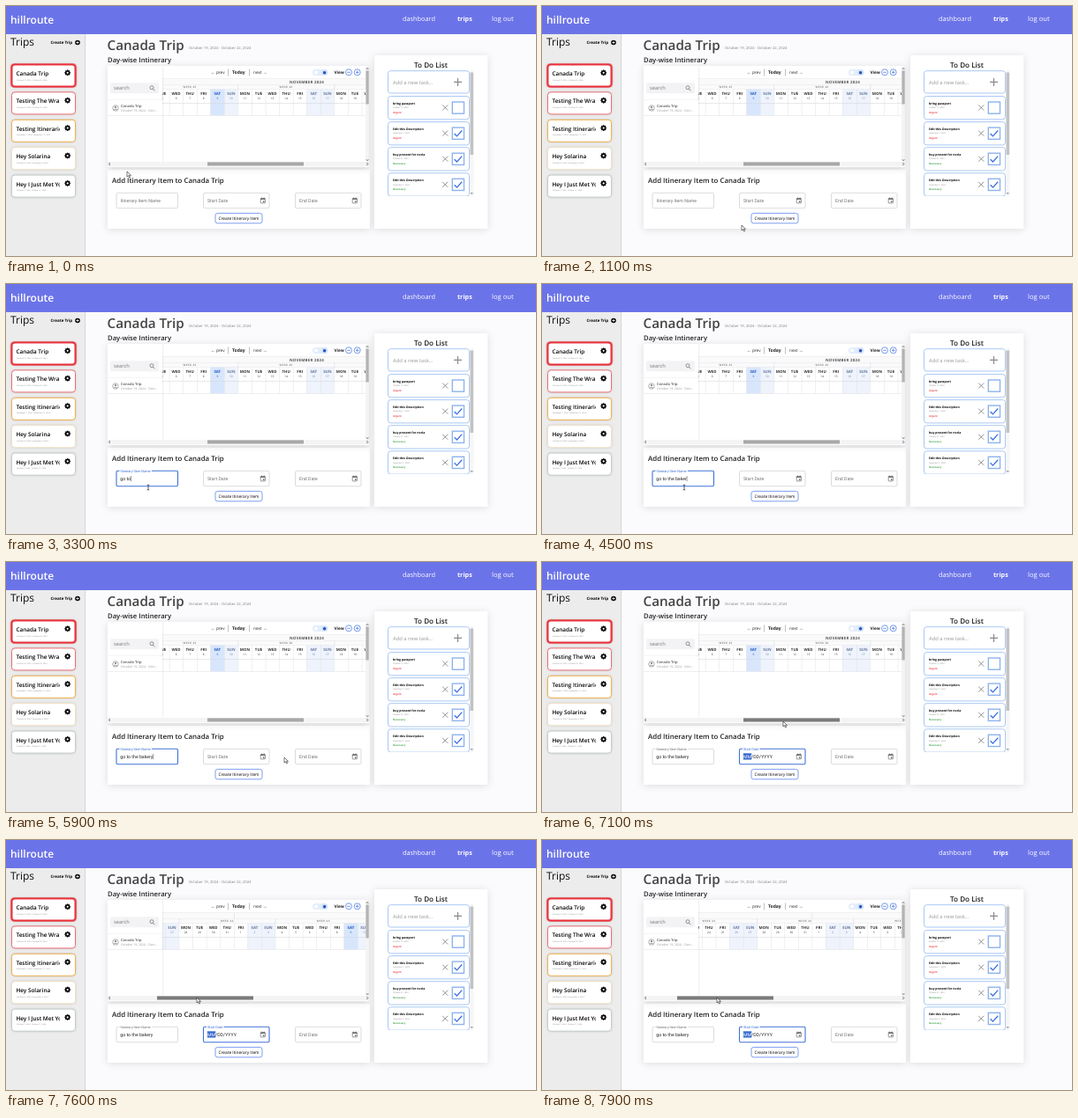
These frames come from a looping animation (600 by 284 pixels, 8 s). An HTML page:

```html
<!DOCTYPE html>
<html lang="en">
<head>
<meta charset="utf-8">
<title>Trip planner</title>
<style>
html, body { margin: 0; width: 100%; height: 100%; overflow: hidden; background: #fbfbfd; }
svg { display: block; width: 600px; height: 284px; font-family: "Open Sans", "Noto Sans", sans-serif; text-rendering: geometricPrecision; }
.field { font-family: Roboto, Arial, sans-serif; }
.card { filter: drop-shadow(0 1.5px 4px rgba(0, 0, 0, .12)); }
.trip { filter: drop-shadow(0 .5px 1px rgba(0, 0, 0, .15)); }
</style>
</head>
<body>
<svg id="stage" viewBox="0 0 600 284"></svg>
<script>
const LOOP = 8000;
const BLUE = '#3b6fe0', PALE = '#a9c8f3', INK = '#202020', GREY = '#808080';
const COL = 15.57, TODAY_X = 239.3, THUMB_X = 228, THUMB_W = 109, SCROLL_RATIO = 2.65;
const PHRASE = 'go to the bakery';

const text = (x, y, s, size, fill = INK, more = '') =>
  `<text x="${x}" y="${y}" font-size="${size}" fill="${fill}" ${more}>${s}</text>`;
const rect = (x, y, w, h, fill, more = '') =>
  `<rect x="${x}" y="${y}" width="${w}" height="${h}" fill="${fill}" ${more}/>`;
const path = (d, stroke, width = 1, more = '') =>
  `<path d="${d}" fill="none" stroke="${stroke}" stroke-width="${width}" ${more}/>`;
const circle = (x, y, r, fill, more = '') => `<circle cx="${x}" cy="${y}" r="${r}" fill="${fill}" ${more}/>`;
const clip = (id, x, y, w, h) => `<clipPath id="${id}">${rect(x, y, w, h, '#000')}</clipPath>`;
const BOLD = 'font-weight="700"', SEMI = 'font-weight="600"', MID = 'text-anchor="middle"';

function gear(x, y) {
  let teeth = '';
  for (let i = 0; i < 4; i++) teeth += rect(x - .8, y - 3.3, 1.6, 6.6, '#000', `transform="rotate(${i * 45} ${x} ${y})"`);
  return teeth + circle(x, y, 2.5, '#000') + circle(x, y, 1.1, '#fff');
}

function sidebar() {
  const trips = [
    ['Canada Trip', 'October 19, 2024 - October 22, 2024', '#e8323c'],
    ['Testing The Wra', 'October 29, 2024 - October 30, 2024', '#ea7077'],
    ['Testing Itineraries', 'November 7, 2024 - November 11, 2024', '#efb04c'],
    ['Hey Solarina', 'October 29, 2024 - November 6, 2024', '#f0e2c6'],
    ['Hey I Just Met You', 'October 7, 2024 - October 11, 2024', '#c3cdc9']
  ];
  let s = rect(0, 32, 90, 252, '#ececec') + rect(89.3, 32, .8, 252, '#cfcfcf')
    + text(5, 45.2, 'Trips', 12, '#111') + text(50.5, 43.2, 'Create Trip', 4.5, '#000', BOLD)
    + circle(81, 41.5, 2.8, '#000') + path('M79.3 41.5h3.4M81 39.8v3.4', '#fff', .8);
  trips.forEach(([name, dates, color], i) => {
    const y = 66.5 + i * 31.4, first = i === 0;
    if (first) s += rect(4.8, y - 1.2, 75.4, 27.4, '#f4a0a4', 'rx="4"');
    s += rect(6.5, y, 72, 25, '#fff', `rx="3.5" stroke="${color}" stroke-width="${first ? 2 : 1}" class="trip"`)
      + `<g clip-path="url(#names)">${text(11.5, y + 12.5, name, 6.4, '#000', SEMI)}</g>`
      + text(12, y + 18.1, dates, 2.05, GREY) + gear(69.7, y + 9.3);
  });
  return s;
}

function days() {
  let s = '';
  const names = ['SUN', 'MON', 'TUE', 'WED', 'THU', 'FRI', 'SAT'];
  for (let d = -20; d < 14; d++) {
    const date = new Date(Date.UTC(2024, 10, 9 + d)), wd = date.getUTCDay();
    const x = TODAY_X + d * COL, left = x - COL / 2, today = d === 0;
    if (wd === 0 || wd === 6) s += rect(left, 94.5, COL, 30, today ? '#d8e6fb' : '#eef3fc');
    const ink = today ? '#2255c8' : wd === 0 || wd === 6 ? '#65789c' : '#333';
    s += rect(left, 94.5, .5, 30, '#e0e0e5')
      + text(x, 100.6, names[wd], 4.4, ink, MID + ' ' + BOLD)
      + text(x, 105.6, date.getUTCDate(), 3.2, ink, MID);
    if (wd === 1) s += rect(left, 89, .5, 6, '#d5d5da');
  }
  for (let w = 42; w < 48; w++)
    s += text(TODAY_X + (5 + (w - 46) * 7) * COL, 93.2, 'WEEK ' + w, 3, '#777', MID + ' ' + SEMI + ' letter-spacing=".4"');
  s += rect(TODAY_X - 8.5 * COL, 83, .5, 7, '#d5d5da');
  return s + text(TODAY_X + 6.5 * COL, 88, 'NOVEMBER 2024', 4.4, '#555', MID + ' ' + BOLD + ' letter-spacing=".25"');
}

function calendar() {
  return rect(115, 68, 296, 115, '#fff', 'class="card"')
    + text(232, 77, '← prev', 4.7) + text(256, 77.2, 'Today', 5, INK, BOLD) + text(280, 77, 'next →', 4.7)
    + rect(251, 71.5, .6, 8, '#999') + rect(275, 71.5, .6, 8, '#999')
    + rect(347, 72, 17.5, 7, '#e3edfc', 'rx="3.5"') + circle(351, 75.5, 2, '#fff')
    + circle(360.6, 75.5, 3.2, '#cfe0fa') + circle(360.6, 75.7, 1.7, '#2450b8')
    + text(371.5, 77.2, 'View', 4.7, INK, BOLD)
    + [388, 397.7].map(x => circle(x, 75.3, 3.5, '#fff', `stroke="${BLUE}" stroke-width=".7"`)).join('')
    + path('M386.2 75.3h3.6M395.9 75.3h3.6M397.7 73.5v3.6', BLUE, .7)
    + rect(177, 82.5, 230, 12, '#fafafb') + rect(177, 82.5, 230, .4, '#ddd') + rect(177, 89.4, 230, .4, '#e4e4e8')
    + `<g clip-path="url(#grid)"><g id="days">${days()}</g></g>`
    + rect(177, 94.3, 230, .4, '#e0e0e5') + rect(177, 110, 230, .5, '#d2d2d8') + rect(177, 124.5, 230, .5, '#dedee3')
    + `<g clip-path="url(#panel)">${rect(115, 68, 62, 109, '#fff', 'style="filter:drop-shadow(.5px 0 1px rgba(0,0,0,.16))"')}</g>`
    + rect(118, 87.3, 55, 12, '#f3f3f5', 'rx="1.5"')
    + text(122, 95.3, 'search', 5.8, '#777')
    + circle(165, 92.7, 2, 'none', 'stroke="#555" stroke-width=".6"') + path('M166.5 94.3l2 2', '#555', .7)
    + rect(115, 106.3, 62, .4, '#e5e5e8') + rect(115, 124.5, 62, .5, '#dedee3')
    + circle(124, 116, 3.2, '#fff', 'stroke="#777" stroke-width=".6"') + circle(124, 115, 1.1, '#777')
    + path('M122 118.2q2 -2.2 4 0', '#777', .7)
    + text(130, 115.4, 'Canada Trip', 4.1, '#555', SEMI)
    + text(130, 120.4, 'October 19, 2024 - Octo...', 3.5, '#999')
    + rect(407, 68, 4, 109, '#f4f4f4') + rect(407.4, 73.5, 3.3, 38, '#b4b4b4')
    + path('M407.8 72l1.3 -1.6 1.3 1.6M407.8 174.2l1.3 1.6 1.3 -1.6', '#666', .8)
    + rect(115, 177, 296, 5.4, '#f4f4f4')
    + `<rect id="thumb" y="177.4" width="${THUMB_W}" height="4.1"/>`
    + path('M118 178l-1.5 1.5 1.5 1.5M408.3 178l1.5 1.5 -1.5 1.5', '#555', .9);
}

function field(id, x, w, label, withIcon) {
  const ix = x + w - 9.8;
  return `<g class="field">`
    + `<rect id="${id}Box" x="${x}" y="212.3" width="${w}" height="17.4" rx="1.5" fill="#fff"/>`
    + `<rect id="${id}Gap" x="${x + 3.5}" y="211.2" height="2.2" fill="#fff"/>`
    + `<text id="${id}Label" x="${x + 4.5}">${label}</text>`
    + (withIcon ? rect(ix, 218.7, 5.2, 5.2, 'none', 'rx=".5" stroke="#6a6a6a" stroke-width=".7"')
      + rect(ix, 218.5, 5.2, 1.4, '#6a6a6a') + path(`M${ix + 1.2} 217.4v2M${ix + 4} 217.4v2`, '#6a6a6a', .7)
      + rect(ix + 2.7, 221.4, 1.6, 1.6, '#6a6a6a') : '') + '</g>';
}

function form() {
  return rect(115, 186, 297, 67, '#fff', 'class="card"')
    + text(120, 201, 'Add Itinerary Item to Canada Trip', 7.9, INK, SEMI)
    + field('name', 125, 69.5, 'Itinerary Item Name')
    + field('start', 223.5, 74.5, 'Start Date', true)
    + field('end', 327.5, 74.5, 'End Date', true)
    + `<g class="field"><text id="typed" x="129.3" y="223" font-size="5.2" fill="${INK}"></text>`
    + rect(129, 218, .5, 6.2, '#333', 'id="caret"')
    + `<g id="mask">${rect(227.8, 217.3, 9.4, 7.2, '#3568cf')}`
    + `<text x="228" y="223" font-size="5.2" fill="${INK}"><tspan fill="#fff">MM</tspan>/DD/YYYY</text></g></g>`
    + rect(237, 235.4, 53, 11.4, '#fff', 'rx="2.5" stroke="#7d9df0" stroke-width="1"')
    + text(263.5, 242.8, 'Create Itinerary Item', 4.8, '#000', MID);
}

function todos() {
  const tasks = [
    ['bring passport', 'October 17, 2024', 1, 0],
    ['Edit this Description', 'November 7, 2024', 1, 1],
    ['buy present for norla', 'October 21, 2024', 0, 1],
    ['Edit this Description', 'November 7, 2024', 0, 1]
  ];
  let s = rect(417, 56, 128.3, 197, '#fff', 'rx="1.5" class="card"')
    + text(481, 69.5, 'To Do List', 8.1, INK, MID + ' ' + SEMI)
    + rect(525.3, 73, 4, 143, '#f6f6f6') + rect(525.5, 75.5, 3.6, 93.5, '#c2c2c2')
    + path('M526.1 212l1.2 1.4 1.2 -1.4', '#666', .8)
    + rect(432.5, 73.7, 92, 25.3, '#fff', `rx="3" stroke="${PALE}"`)
    + text(438, 88.5, 'Add a new task...', 5.8, '#999')
    + path('M507 86.4h9M511.5 81.9v9', '#8a8a8a', 1.2)
    + '<g clip-path="url(#tasks)">';
  tasks.forEach(([name, date, urgent, done], i) => {
    const y = 102.5 + i * 29.1;
    s += rect(432.5, y, 92, 26.3, '#fff', `rx="3" stroke="${PALE}"`)
      + text(438, y + 9.4, name, 3.45, '#000', BOLD) + text(438, y + 13.7, date, 2.2, GREY)
      + text(438, y + 19, urgent ? 'Urgent' : 'Necessary', 2.9, urgent ? '#e8222a' : '#2a9a35', SEMI)
      + path(`M494.2 ${y + 10}l6 6m0 -6l-6 6`, '#858585', .9)
      + rect(505.3, y + 6.5, 13.2, 13.2, '#fff', 'stroke="#8eb3ee" stroke-width="1.4"')
      + (done ? path(`M507.6 ${y + 13.4}l2.8 2.9 5.8 -6.4`, BLUE, 1.3) : '');
  });
  return s + '</g>';
}

const stage = document.getElementById('stage');
stage.innerHTML = '<defs>' + clip('names', 11, 66, 50, 160) + clip('grid', 177, 82, 230, 95)
  + clip('panel', 115, 68, 66, 109) + clip('tasks', 431, 101, 95, 115) + '</defs>'
  + rect(0, 0, 600, 284, '#fbfbfd') + sidebar()
  + rect(0, 0, 600, 32, '#6b73e8')
  + text(5, 20.2, 'hillroute', 12, '#fff', SEMI)
  + text(449, 17, 'dashboard', 7.35, '#fff') + text(511, 17, 'trips', 7.2, '#fff', BOLD) + text(550, 17, 'log out', 7.6, '#fff')
  + text(114.5, 50, 'Canada Trip', 15.2, '#444', SEMI)
  + text(207, 48.6, 'October 19, 2024 - October 22, 2024', 4.2, GREY)
  + text(115, 64, 'Day-wise Intinerary', 7.7, INK, SEMI)
  + form() + calendar() + todos()
  + '<path id="arrow" d="M0 0v6l1.5 -1.3 1.1 2.4 1 -.5 -1.1 -2.2h2z" fill="#fff" stroke="#222" stroke-width=".6"/>'
  + '<path id="beam" d="M-1.3 -3q1.3 0 1.3 .8q0 -.8 1.3 -.8M0 -2.4v5M-1.3 3q1.3 0 1.3 -.8q0 .8 1.3 .8" fill="none" stroke="#222" stroke-width=".7"/>';

const part = {};
stage.querySelectorAll('[id]').forEach(el => { part[el.id] = el; });
const set = (el, attrs) => { for (const k in attrs) el.setAttribute(k, attrs[k]); };
const show = (el, on) => set(el, { visibility: on ? 'visible' : 'hidden' });

// Each row: time, then values reached at that time.
const MOUSE = [[0, 137, 188], [900, 137, 188], [1000, 180, 218], [1100, 226, 249], [1300, 226, 249],
  [1500, 190, 236], [1700, 161, 231], [5100, 161, 231], [5700, 315, 222], [5900, 315, 222],
  [6300, 252, 222], [6700, 252, 221], [7000, 273, 181], [7100, 273, 181]];
const THUMB = [[0, 228], [7100, 228], [7200, 220], [7400, 196], [7600, 171], [7700, 162], [7900, 153]];
const FOCUS = 1700, TYPE_FROM = 2700, TYPE_TO = 4600, DATE_FOCUS = 6300;

function at(rows, t) {
  const i = rows.findIndex(r => r[0] > t);
  if (i < 0) return rows[rows.length - 1].slice(1);
  const a = rows[i - 1], b = rows[i], k = (t - a[0]) / (b[0] - a[0]);
  return a.slice(1).map((v, j) => v + (b[j + 1] - v) * k);
}
const ramp = (t, from) => Math.min(1, Math.max(0, (t - from) / 200));

function styleField(id, lift, active, width) {
  set(part[id + 'Box'], { stroke: active ? '#3f72d8' : '#c4c4c4', 'stroke-width': active ? 1.1 : .6 });
  set(part[id + 'Gap'], { width: width * lift });
  set(part[id + 'Label'], { y: 223 - 9.5 * lift, 'font-size': 5.2 - 1.3 * lift, fill: active ? '#3f72d8' : '#707070' });
}

function draw(time) {
  const t = Math.floor(time % LOOP / 100) * 100;
  const dragging = t >= 7100;
  const [thumb] = at(THUMB, t);
  set(part.thumb, { x: thumb, fill: dragging ? '#7b7b7b' : '#a8a8a8' });
  set(part.days, { transform: `translate(${(THUMB_X - thumb) * SCROLL_RATIO} 0)` });

  const inName = t >= FOCUS && t < DATE_FOCUS, inDate = t >= DATE_FOCUS;
  styleField('name', ramp(t, FOCUS), inName, 36.5);
  styleField('start', ramp(t, DATE_FOCUS), inDate, 19.5);
  styleField('end', 0, false, 0);
  show(part.mask, t > DATE_FOCUS);

  const count = t < TYPE_FROM ? 0
    : Math.min(PHRASE.length, 1 + Math.floor((t - TYPE_FROM) / (TYPE_TO - TYPE_FROM) * (PHRASE.length - 1)));
  part.typed.textContent = PHRASE.slice(0, count);
  const typing = t >= TYPE_FROM && t <= TYPE_TO;
  const blink = (t - (t < TYPE_FROM ? FOCUS : TYPE_TO + 200)) % 1000 < 500;
  show(part.caret, inName && (typing || blink));
  set(part.caret, { x: 129.3 + (count ? part.typed.getComputedTextLength() : 0) });

  const [x, y] = dragging ? [thumb + 45, t < 7200 ? 181 : 179] : at(MOUSE, t);
  const inside = (a, b) => x > a && x < b && y > 212 && y < 232;
  const beam = inside(125, 195) || inside(223, 286);
  show(part.beam, beam);
  show(part.arrow, !beam);
  set(beam ? part.beam : part.arrow, { transform: `translate(${x} ${y})` });
}

const begin = performance.now();
function tick() {
  draw(performance.now() - begin);
  requestAnimationFrame(tick);
}
tick();
</script>
</body>
</html>
```
